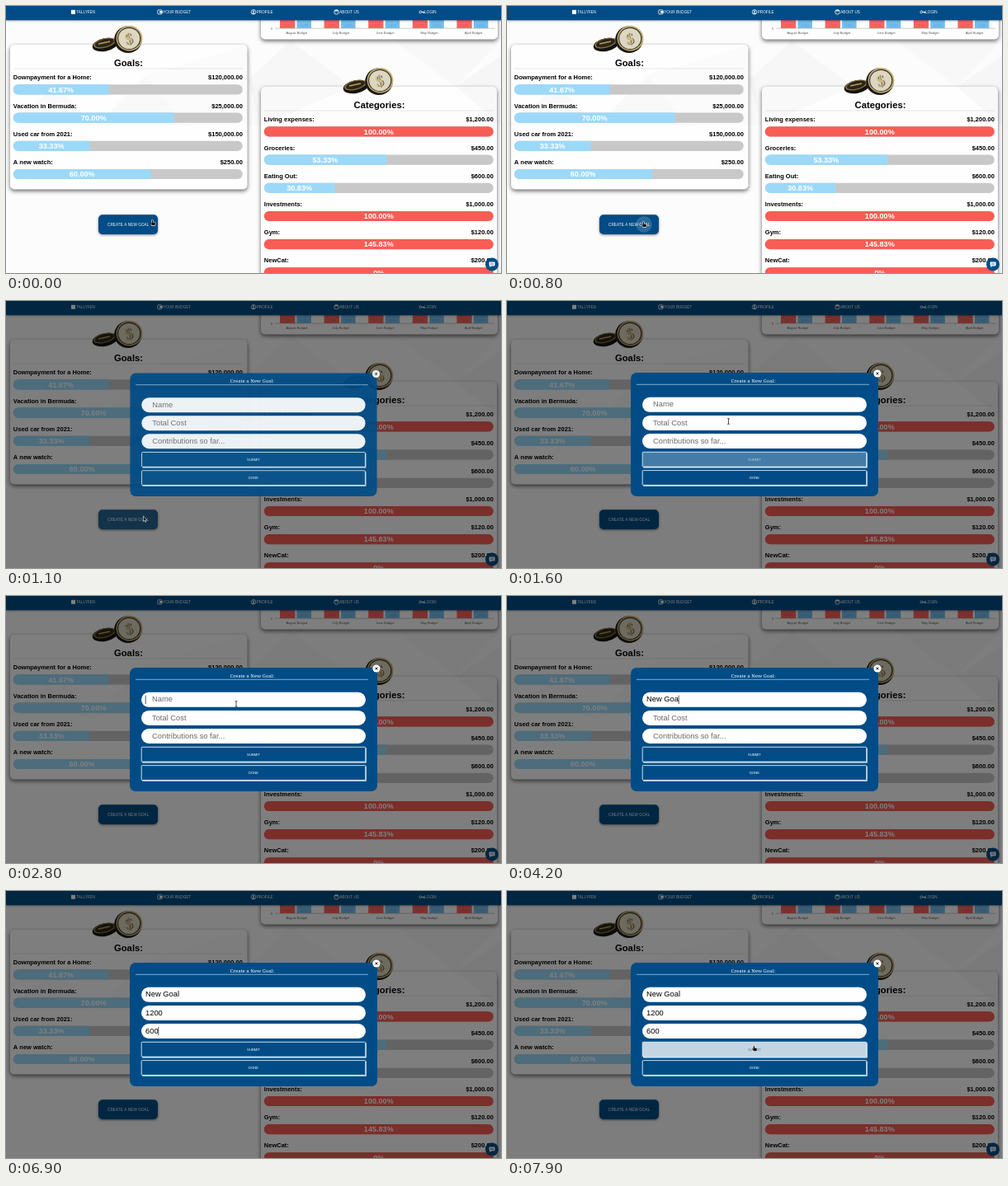
An HTML page with a canvas for the animation above (8 s loop, 600 px wide and 324 px high).

```html
<!DOCTYPE html>
<html lang="en">
<head>
<meta charset="utf-8">
<title>Budget goals</title>
<style>
html, body { margin: 0; width: 100%; height: 100%; overflow: hidden; background: #fcfcfc; }
canvas { display: block; width: 600px; height: 324px; }
</style>
</head>
<body>
<canvas id="stage"></canvas>
<script>
const W = 600, H = 324, LOOP = 8000;
const BLUE = '#014c86', SKY = '#9cd9f9', RED = '#f75d55', GREY = '#c8c8c8';
const SANS = '"Liberation Sans", Arial, sans-serif';
const canvas = document.getElementById('stage');
const dpr = window.devicePixelRatio || 1;
canvas.width = W * dpr;
canvas.height = H * dpr;
const c = canvas.getContext('2d');

const clamp = v => Math.max(0, Math.min(1, v));
const ramp = (t, a, b) => clamp((t - a) / (b - a));
const ease = p => p * p * (3 - 2 * p);
const mix = (a, b, p) => a + (b - a) * p;
const blend = (a, b, p) => `rgb(${a.map((v, i) => Math.round(mix(v, b[i], p)))})`;

function text(s, x, y, size, color, align = 'left', weight = 400, family = SANS) {
  c.font = `${weight} ${size}px ${family}`;
  c.textAlign = align;
  c.fillStyle = color;
  c.fillText(s, x, y);
}

function box(x, y, w, h, r, fill, stroke, lw = 1) {
  c.beginPath();
  c.roundRect(x, y, w, h, r);
  if (fill) { c.fillStyle = fill; c.fill(); }
  if (stroke) { c.strokeStyle = stroke; c.lineWidth = lw; c.stroke(); }
}

function disc(x, y, rx, ry, fill, rot = 0) {
  c.beginPath();
  c.ellipse(x, y, rx, ry, rot, 0, 7);
  c.fillStyle = fill;
  c.fill();
}

function poly(pts, fill) {
  c.beginPath();
  for (let i = 0; i < pts.length; i += 2) c.lineTo(pts[i], pts[i + 1]);
  c.closePath();
  c.fillStyle = fill;
  c.fill();
}

function line(x1, y1, x2, y2, color, lw) {
  c.beginPath();
  c.moveTo(x1, y1);
  c.lineTo(x2, y2);
  c.strokeStyle = color;
  c.lineWidth = lw;
  c.stroke();
}

function shadowed(draw, blur, dy, color) {
  c.save();
  c.shadowColor = color;
  c.shadowBlur = blur * dpr;
  c.shadowOffsetY = dy * dpr;
  draw();
  c.restore();
}

const card = (x, y, w, h) =>
  shadowed(() => box(x, y, w, h, 5, '#fefefe'), 5, 2, 'rgba(0,0,0,.6)');

function facets() {
  poly([0, 145, 62, 96, 108, 145], 'rgba(0,0,0,.018)');
  poly([108, 145, 170, 84, 222, 145], 'rgba(0,0,0,.018)');
  poly([170, 84, 293, 47, 308, 145, 222, 145], 'rgba(0,0,0,.012)');
  poly([293, 90, 345, 42, 420, 98, 309, 145], 'rgba(0,0,0,.02)');
  poly([470, 42, 600, 42, 545, 98], 'rgba(0,0,0,.014)');
  poly([545, 98, 600, 60, 600, 145], 'rgba(0,0,0,.022)');
}

function coins(x, y) {
  disc(x - 17, y + 7, 15.5, 7.8, '#15130f', -.2);
  disc(x - 17.6, y + 5, 13.6, 5.8, '#8a743f', -.25);
  disc(x - 17.6, y + 4.8, 11.8, 4.6, '#2b261b', -.25);
  line(x - 25, y + 6, x - 11, y + 3, '#b79b57', 1.4);
  disc(x + 11, y + .7, 16.8, 16.4, '#1c1a17');
  disc(x + 12.5, y - .7, 15.9, 15.2, '#c9b272');
  disc(x + 12.3, y - .6, 14.2, 13.7, '#3a352a');
  disc(x + 12.2, y - .5, 13, 12.6, '#dcd6c2');
  c.save();
  c.translate(x + 12, y);
  c.rotate(-.2);
  text('$', .6, 6.5, 19, '#5d5541', 'center', 700, '"Liberation Serif", serif');
  text('$', -.4, 6, 19, '#cdbb86', 'center', 700, '"Liberation Serif", serif');
  c.restore();
}

function meter(x, y, [name, cost, pct]) {
  const w = 278, over = pct >= 100 || pct === 0;
  const fw = over ? w : w * pct / 100;
  text(name, x, y, 7.5, '#000', 'left', 700);
  text(cost, x + w, y, 7.5, '#000', 'right', 700);
  box(x, y + 5.9, w, 12.2, 6.1, GREY);
  box(x, y + 5.9, fw, 12.2, over ? 6.1 : [6.1, 0, 0, 6.1], over ? RED : SKY);
  const label = pct ? pct.toFixed(2) + '%' : '0%';
  text(label, x + fw / 2, y + 15.1, 9.1, '#fff', 'center', 700);
}

function panel(x, y, title, rows) {
  coins(x + 132, y - 7);
  text(title, x + 143.5, y + 26.3, 11.27, '#000', 'center', 700);
  line(x + 4, y + 29, x + 282, y + 29, '#d5d5d5', .6);
  rows.forEach((row, i) => meter(x + 3.8, y + 42.4 + i * 34.2, row));
}

const GOALS = [
  ['Downpayment for a Home:', '$120,000.00', 41.67],
  ['Vacation in Bermuda:', '$25,000.00', 70],
  ['Used car from 2021:', '$150,000.00', 33.33],
  ['A new watch:', '$250.00', 60]
];
const CATEGORIES = [
  ['Living expenses:', '$1,200.00', 100],
  ['Groceries:', '$450.00', 53.33],
  ['Eating Out:', '$600.00', 30.83],
  ['Investments:', '$1,000.00', 100],
  ['Gym:', '$120.00', 145.83],
  ['NewCat:', '$200.00', 0]
];

function chart() {
  card(309, 5, 287, 35.5);
  line(326, 27.2, 592, 27.2, '#aaa', .6);
  text('0', 323, 28.5, 3.6, '#666', 'right');
  ['August', 'July', 'June', 'May', 'April'].forEach((m, i) => {
    const x = 332 + i * 53.6;
    box(x, 10, 18.3, 17, 0, '#f7655f');
    box(x + 20.5, 10, 17.5, 17, 0, '#74bdec');
    text('1500', x + 9, 24.5, 4.4, 'rgba(110,30,30,.2)', 'center');
    text('1200', x + 29, 24.5, 4.4, 'rgba(30,60,110,.18)', 'center');
    text(m + ' Budget', x + 20.3, 34.4, 3.95, '#555', 'center');
  });
}

function navIcon(kind, x) {
  c.strokeStyle = '#fff';
  c.lineWidth = .8;
  if (kind === 'ring') {
    c.beginPath();
    c.arc(x + 3, 7.3, 2.8, 0, 7);
    c.stroke();
    disc(x + 3, 6.4, 1, 1, '#fff');
    disc(x + 3, 8.7, 1.6, .8, '#fff');
  } else if (kind === 'face') {
    c.beginPath();
    c.arc(x + 3, 7.3, 2.8, 0, 7);
    c.stroke();
    line(x + .8, 5.7, x + 5.2, 5.7, '#fff', 1.2);
    disc(x + 2, 7.8, .4, .4, '#fff');
    disc(x + 4, 7.8, .4, .4, '#fff');
  } else if (kind === 'key') {
    c.beginPath();
    c.arc(x + 1.8, 7.3, 1.4, 0, 7);
    c.stroke();
    line(x + 3.2, 7.3, x + 6.8, 7.3, '#fff', 1);
    line(x + 5.8, 7.3, x + 5.8, 9, '#fff', 1);
  } else if (kind === 'wallet') {
    box(x + .4, 4.8, 5, 5, .6, null, '#fff', .8);
    box(x + 2.6, 6, 3.7, 2.6, .4, '#fff');
  } else {
    box(x + .5, 4.8, 5, 5, 0, '#fff');
  }
}

function nav() {
  shadowed(() => box(0, 0, W, 17.3, 0, BLUE), 3, 1, 'rgba(0,0,0,.45)');
  [['square', 78.5, 'TALLYFEN'], ['wallet', 183.5, 'YOUR BUDGET'], ['ring', 297, 'PROFILE'],
   ['face', 397.5, 'ABOUT US'], ['key', 500.5, 'LOGIN']].forEach(([icon, x, label]) => {
    navIcon(icon, x);
    text(label, x + 6.8, 9, 4.62, '#fff');
  });
}

function goalButton(t) {
  shadowed(() => box(112, 253.3, 72, 23.6, 5, BLUE), 3, 1, 'rgba(0,0,0,.5)');
  const p = ramp(t, 780, 1150);
  if (p > 0 && t < 1450) {
    c.save();
    box(112, 253.3, 72, 23.6, 5);
    c.clip();
    const r = 6 + 66 * p;
    disc(166, 265, r, r, `rgba(255,255,255,${.17 * (1 - ramp(t, 1050, 1450))})`);
    c.restore();
  }
  c.letterSpacing = '.1px';
  text('CREATE A NEW GOAL', 148.2, 266.7, 4.6, '#fff', 'center');
  c.letterSpacing = '0px';
}

function chatBubble() {
  disc(589, 313.5, 8, 8, BLUE);
  box(585.6, 310.4, 7, 5, .8, '#fff');
  poly([586.4, 315, 588.8, 315, 586.4, 317.3], '#fff');
  line(587, 312.1, 591.2, 312.1, BLUE, .5);
  line(587, 313.7, 591.2, 313.7, BLUE, .5);
}

function page(t) {
  box(0, 0, W, H, 0, '#fcfcfc');
  card(5, 47, 287.5, 175.5);
  card(309, 98, 286, 260);
  chart();
  facets();
  panel(5, 47, 'Goals:', GOALS);
  panel(309, 98, 'Categories:', CATEGORIES);
  goalButton(t);
  nav();
  chatBubble();
}

// focus: when the field takes the caret; first, gap: first key and time between keys
const FIELDS = [
  { hint: 'Name', value: 'New Goal', focus: 2500, first: 3050, gap: 170 },
  { hint: 'Total Cost', value: '1200', focus: 4900, first: 5200, gap: 200 },
  { hint: 'Contributions so far...', value: '600', focus: 6200, first: 6400, gap: 200 }
];

function field(f, i, t) {
  const y = 116.8 + i * 22.1, base = y + 11.6;
  const n = Math.max(0, Math.min(f.value.length, Math.floor((t - f.first) / f.gap) + 1));
  const typed = f.value.slice(0, n);
  box(164, y, 272, 18, 9, '#fefefe');
  if (n) text(typed, 169, base, 9.35, '#000');
  else text(f.hint, 177, base, 9.35, '#6a6a6a');
  const next = FIELDS[i + 1];
  if (t < f.focus || t >= (next ? next.focus : 7750)) return;
  const last = n ? f.first + (n - 1) * f.gap : f.focus;
  if ((t - last) % 1000 < 500) {
    c.font = `9.35px ${SANS}`;
    const x = 169.2 + c.measureText(typed).width;
    line(x, y + 3.8, x, y + 14.2, '#111', .7);
  }
}

function formButton(label, y, hover) {
  const deep = [1, 76, 134], white = [255, 255, 255];
  box(165, y + 1, 272, 18.4, 1, '#a9cbe0');
  box(164.2, y, 271.6, 17.8, 1, blend(deep, white, hover), '#e4eff7', .9);
  text(label, 300, y + 10.4, 4.2, blend(white, deep, hover), 'center');
}

function submitHover(t) {
  return t < 4000
    ? ease(ramp(t, 1250, 1380)) * (1 - ease(ramp(t, 1400, 1705)))
    : ease(ramp(t, 7600, 8040));
}

// cubic-bezier(.38, .1, .36, .9)
function bezier(p) {
  const curve = (s, a, b) => 3 * (1 - s) * (1 - s) * s * a + 3 * (1 - s) * s * s * b + s * s * s;
  let lo = 0, hi = 1;
  for (let i = 0; i < 18; i++) {
    const s = (lo + hi) / 2;
    if (curve(s, .38, .36) < p) lo = s; else hi = s;
  }
  return curve(hi, .1, .9);
}

const OPEN = 865;

function modal(t) {
  const p = bezier(ramp(t, OPEN, OPEN + 300)), k = mix(.96, 1, p);
  c.save();
  c.globalAlpha = p;
  c.translate(300, 162 + mix(4, 0, p));
  c.scale(k, k);
  c.translate(-300, -162);
  box(150, 87, 300, 150, 7, BLUE);
  text('Create a New Goal:', 298.3, 98.6, 5.95, '#fff', 'center', 400, '"Noto Serif", serif');
  line(157, 101.3, 439, 101.3, '#a5c6de', .8);
  FIELDS.forEach((f, i) => field(f, i, t));
  formButton('SUBMIT', 183.3, submitHover(t));
  formButton('DONE', 205.6, 0);
  disc(449, 88, 4.6, 4.6, '#fff');
  line(447.6, 86.6, 450.4, 89.4, '#000', 1);
  line(450.4, 86.6, 447.6, 89.4, '#000', 1);
  c.restore();
}

const PATH = [
  [0, 178, 263], [150, 178, 263], [600, 166, 265], [1080, 166, 265],
  [1600, 268.5, 146], [2200, 281, 129], [2450, 279, 131], [7100, 279, 131],
  [7750, 300, 191], [8000, 300, 191]
];

function pointer(t) {
  if (t > 3050 && t < 7100) return;
  const i = PATH.findIndex(k => k[0] > t), a = PATH[i - 1], b = PATH[i];
  const p = ease(ramp(t, a[0], b[0]));
  const x = mix(a[1], b[1], p), y = mix(a[2], b[2], p);
  const open = t > OPEN + 250;
  const inside = x > 164 && x < 436;
  const row = (y - 116.8) / 22.1;
  c.save();
  c.translate(x, y);
  c.lineJoin = 'round';
  if (open && inside && row > 0 && row < 3 && row % 1 < .82) {
    line(0, -3, 0, 3, '#222', .8);
    line(-1.5, -3.3, 1.5, -3.3, '#222', .7);
    line(-1.5, 3.3, 1.5, 3.3, '#222', .7);
  } else if (t < OPEN || (open && inside && y > 183 && y < 223)) {
    c.beginPath();
    c.roundRect(-1.4, -3, 1.5, 5, .7);
    c.roundRect(-1.6, -.4, 4.4, 3.7, 1);
    c.strokeStyle = '#fff';
    c.lineWidth = 1.2;
    c.stroke();
    c.fillStyle = '#111';
    c.fill();
    line(-2.6, .2, -1, 2, '#111', .9);
  } else {
    poly([0, -3.5, 0, 3, 1.4, 1.8, 2.5, 4, 3.4, 3.5, 2.5, 1.5, 4.3, 1.3], '#000');
    c.strokeStyle = '#fff';
    c.lineWidth = .6;
    c.stroke();
  }
  c.restore();
}

function frame(now) {
  const t = now % LOOP;
  c.setTransform(dpr, 0, 0, dpr, 0, 0);
  page(t);
  if (t >= OPEN) {
    box(0, 0, W, H, 0, 'rgba(0,0,0,.5)');
    modal(t);
  }
  pointer(t);
  requestAnimationFrame(frame);
}
requestAnimationFrame(frame);
</script>
</body>
</html>
```
